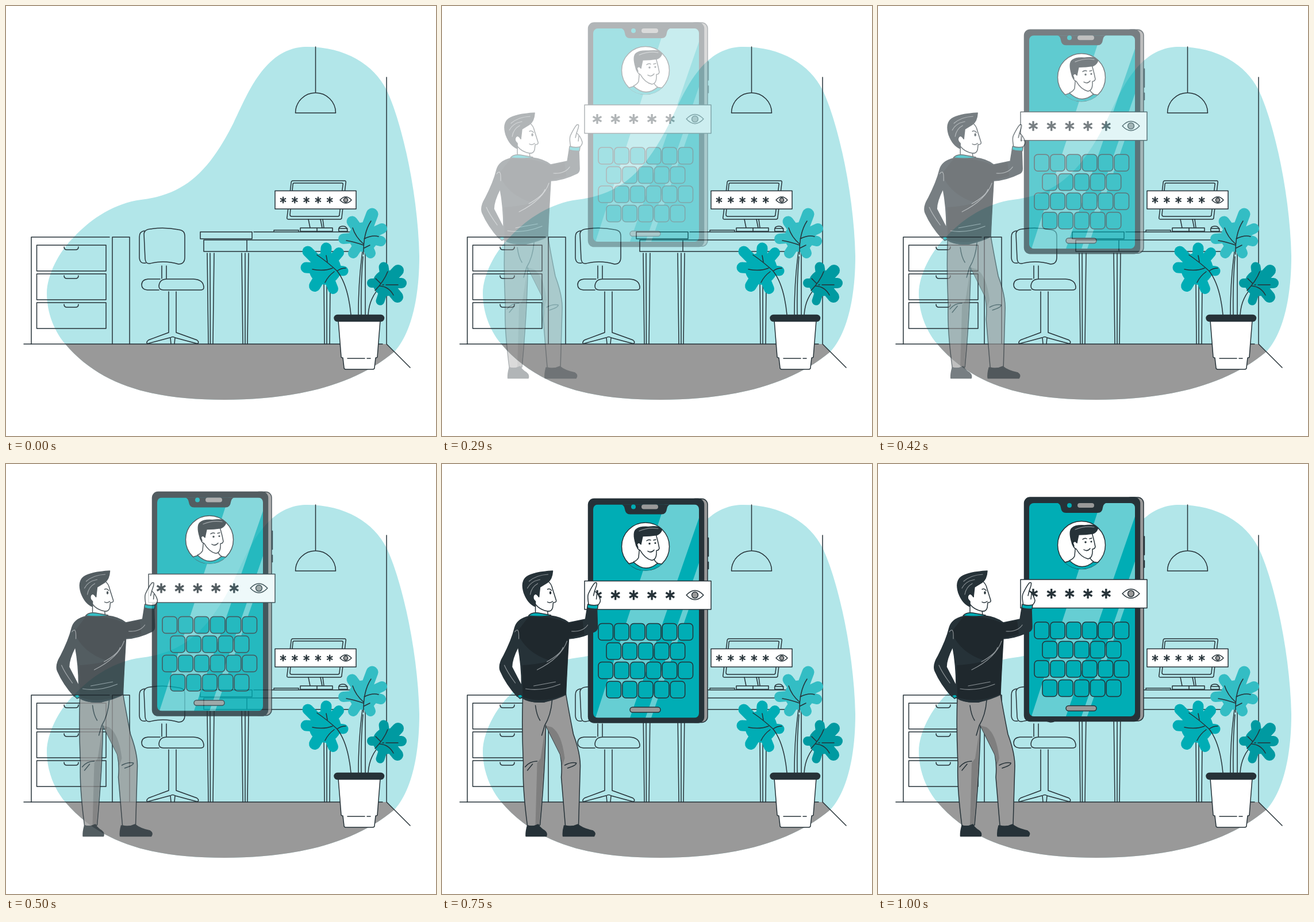
Recreate the animation shown at these times as an HTML page. Size 748x748 px, loop 1040 ms.

```html
<!DOCTYPE html>
<html lang="en">
<head>
<meta charset="utf-8">
<title>Password entry</title>
<style>
html, body { margin: 0; width: 100%; height: 100%; overflow: hidden; background: #fff; }
svg { display: block; width: 100%; height: 100%; }
.line { fill: none; stroke: #263238; stroke-width: 1.5; stroke-linecap: round; stroke-linejoin: round; }
.none { stroke: none; }
.white { fill: #fff; }
.teal { fill: #00adb5; }
.gray { fill: #999; }
.dark { fill: #263238; }
.shade { fill: #7f7f7f; stroke: none; }
.light { stroke: #8b9296; stroke-width: 1.2; fill: none; }
.glare { fill: #fff; opacity: .4; stroke: none; }
</style>
</head>
<body>
<svg viewBox="0 0 748 748">
  <defs>
    <path id="blob" d="M524 71C590 71 640 102 662 146C690 205 717 330 719 435C719 510 704 570 676 601C600 665 490 685 380 685C258 685 166 662 103 588C85 567 71 535 71 500C71 468 93 426 118 402C150 368 190 343 235 337C310 328 352 290 396 203C420 154 450 71 524 71Z"/>
    <clipPath id="room"><use href="#blob"/></clipPath>
    <clipPath id="screen"><rect x="263" y="68" width="184" height="371" rx="8"/></clipPath>
    <clipPath id="round"><circle cx="354" cy="141" r="42"/></clipPath>
  </defs>

  <use href="#blob" fill="#b2e6e9"/>
  <path d="M0 588H662L702 629L748 748H0Z" class="gray" clip-path="url(#room)"/>

  <g class="line">
    <path d="M31 588H655M662 124V588L703 629"/>
    <path d="M538.5 71V151M503.5 186A35 35 0 0 1 573.5 186Z"/>
    <!-- cabinet -->
    <path d="M180 402H44V588M185 402H215V588M185 402V588"/>
    <g id="drawers"></g>
    <!-- chair -->
    <path d="M240 396Q241 389 250 388Q275 384 300 389Q311 390 311 400V437Q311 449 300 449Q287 445 273 445Q262 445 250 448Q243 449 242 440Z"/>
    <path d="M241 391Q232 392 232 402V438Q233 449 243 447M271 452V474M279 452V474"/>
    <path d="M268 475H247Q236 476 236 485Q236 493 246 494H266"/>
    <path d="M280 475H326Q344 476 344 490Q344 494 338 494H274Q266 494 266 487Q267 475 280 475Z"/>
    <path d="M283 497V568L248 581Q243 585 246 587.5L285 577M296 497V568L332 581Q337 585 333 587.5L294 577M287 588L286 577Q290 574 294 577L293 588"/>
    <!-- desk -->
    <path d="M338 393H428V405H338ZM431 393H600M344 407V427H600M344 407H600M419 407V427"/>
    <path d="M350 430L352 588M355 430L355.5 588M362 430L360 588M410 430L412 588M416 430V588M422 430L420 588M553 480L554 588M558 480V588M564 480L563 588"/>
    <!-- computer -->
    <path d="M499 304H589Q592 304 591 308L584 368Q584 371 581 371H491Q488 371 489 367L496 308Q496 304 499 304ZM501 308H584Q587 308 586 311L580 363Q580 366 577 366H497Q494 366 494 363L499 311Q499 308 501 308Z"/>
    <path d="M526 371L529 386M547 371L550 386M551 371L553 386M512 386H568V392H512ZM541 386V392M466 392V390H509V392M579 392Q577 383 586 383Q594 383 594 392ZM579 387H594"/>
    <rect x="468" y="321.5" width="141" height="31.5" class="white"/>
    <g id="smallCode"></g>
  </g>

  <!-- plant -->
  <g class="line">
    <path d="M622 414Q613 470 613 537M625 430V537M621 436Q617 480 618 537M655 485Q632 505 630 537"/>
    <g id="leaves"></g>
    <path d="M541 433Q560 446 576 461Q595 485 600 537M568 456Q553 462 533 458M571 462Q560 470 555 481M576 461Q582 456 591 456M559 445L557 434"/>
    <path d="M622 432Q621 395 635 374M622 414Q608 402 603 386M623 405Q637 398 648 401M622 416Q605 410 592 408M623 421L633 416"/>
    <path d="M642 495Q658 478 664 462M655 485H657M661 485H682M650 487Q666 488 674 503M652 483L643 474"/>
    <path class="white" d="M578 547L583 610Q583 612 586 612L588 629Q588 632 591 632H638Q641 632 641 629L643 612Q646 612 646 610L651 547Z"/>
    <path d="M594 613H624M628 613H634"/>
    <rect x="571" y="537.5" width="86.5" height="11" rx="5.5" class="dark"/>
  </g>

  <!-- phone -->
  <g id="phone" class="line">
    <path class="dark" d="M462 126h1.5v32H462ZM462 168h1.5v12H462Z"/>
    <rect x="430" y="58" width="32" height="389" rx="10" class="gray"/>
    <rect x="254.5" y="58" width="201" height="389.5" rx="10" class="dark"/>
    <g clip-path="url(#screen)">
      <rect x="263" y="68" width="184" height="371" class="teal none"/>
      <path class="glare" d="M387 68H455L327 439H267ZM354 439H364L492 68H482Z"/>
      <path class="dark none" d="M309 67Q317 68 318 76Q319 85 327 85H382Q390 85 391 76Q392 68 400 67Z"/>
    </g>
    <circle cx="333" cy="72" r="4" class="teal none"/>
    <rect x="347" y="68" width="29" height="8" rx="4" class="gray none"/>
    <rect x="327" y="420.5" width="53" height="9" rx="4.5" class="gray"/>
    <g id="keys" class="teal"></g>
    <circle cx="354" cy="141" r="41.5" class="white"/>
    <g clip-path="url(#round)">
      <path class="teal" d="M322 172Q334 169 341 165Q354 182 372 170L386 172V190H320Z"/>
      <path class="white" d="M344 138L342 160Q340 165 333 168Q354 188 375 170Q368 166 368 158Z"/>
      <path class="white" d="M347 120L371 117Q375 128 378 144Q377 148 373 148Q374 164 365 165Q353 162 345 148Q338 145 339 137Q342 132 346 137Z"/>
      <path class="dark" d="M337 136Q331 116 338 111Q344 106 359 107Q375 105 383 109Q382 118 374 121Q362 123 349 123L346 137Q342 132 339 137L341 143Q338 142 337 136Z"/>
      <path class="light" d="M343 114Q360 107 376 110"/>
      <path d="M356 131Q360 128 363 130M368 130L372 129M358 149Q364 153 369 147"/>
      <circle cx="361" cy="136" r="1" class="dark"/><circle cx="371" cy="135" r=".8" class="dark"/>
    </g>
    <rect x="248" y="201" width="220" height="49.5" class="white"/>
    <g id="bigCode"></g>
  </g>

  <!-- man -->
  <g id="man" class="line">
    <path class="gray" d="M138 405Q150 416 175 414L213 400Q218 430 226 470Q238 502 238 525L235 628Q222 632 212 629L205 545Q207 522 203 505L178 455Q177 530 168 628Q156 632 146 629Q137 560 139 520Q136 460 138 405Z"/>
    <path class="shade" d="M178 455L203 505L207 524L211 512Q206 470 189 458ZM176 466L169 512L163 520L160 628L167 627L175 520Z"/>
    <path d="M160 420Q162 437 168 446M189 411Q187 437 176 455L171 472M142 527Q150 517 163 517M146 533L155 522M211 524Q222 518 231 520Q232 524 216 529"/>
    <path class="dark" d="M146 629Q143 640 143.5 647.5H179Q181 642 176 638Q168 633 165 627Q155 632 146 629ZM210 629Q207 640 208 647.5H262Q266 642 260 638Q242 634 234 627Q222 633 210 629Z"/>
    <path class="white" d="M160 235V266Q172 270 182 264L181 254Z"/>
    <path class="white" d="M166 212L181 203Q188 208 190 218L196 237Q197 241 191 241L190 250Q188 257 181 256Q168 254 160 244Q154 233 157 228Q162 223 166 231Z"/>
    <path class="dark" d="M190 186Q189 201 181 206L168 214L166 231Q161 223 157 228Q154 234 160 239V248Q147 243 140 224Q134 204 145 196Q157 188 190 186Z"/>
    <path class="light" d="M149 204Q162 193 182 192M146 216Q152 204 168 201M151 227Q153 214 164 208"/>
    <path d="M181 218Q185 216 188 220M181 240Q185 243 190 239"/>
    <ellipse cx="186" cy="224" rx="1" ry="2" class="dark"/>
    <path class="teal" d="M148 264Q153 258 165 259L187 263L181 267Z"/>
    <path class="dark" fill-rule="evenodd" d="M148 265Q128 270 124 285Q119 306 104 335Q95 350 99 360Q109 383 128 404L137 407Q150 416 175 414Q200 408 213 401Q214 370 218 304Q240 303 264 291Q268 289 268 283L267 252L250 251L247 270L218 276Q205 266 186 264Q165 266 148 265ZM130 318Q119 340 119 353L136 386Q136 350 130 318Z"/>
    <path fill="#1f282d" stroke="none" d="M148 266Q190 264 217 277L242 272L245 296L218 303L213 400Q175 418 138 406L137 350Q170 348 185 342Q142 328 128 292Z"/>
    <path class="light" d="M163 358Q205 337 215 308M180 344Q205 330 208 319M143 391Q170 396 203 383M157 386L195 379M124 292Q132 282 131 304M223 291Q243 292 251 280M106 350Q111 362 125 381"/>
    <path class="teal" d="M128 403L135 400L138 405L133 408Z"/>
    <path class="white" d="M253 246Q250 232 252 226Q258 213 263 207Q268 204 266 212L263 221Q270 226 273 237Q273 242 267 247Z"/>
    <path d="M263 221L261 229M267 226L266 235"/>
    <path class="teal" d="M251 244Q260 247 269 245L268 252Q258 253 250 250Z"/>
  </g>
</svg>
<script>
const get = id => document.getElementById(id);
const fill = (id, html) => { get(id).innerHTML = html; };
const times = (n, f) => Array.from({ length: n }, (_, i) => f(i)).join('');

fill('drawers', times(3, i => `<g transform="translate(0 ${i * 50})">
  <rect x="53.5" y="416" width="120.5" height="45"/>
  <path d="M101 419Q101 424 106 424H121Q126 424 126 419"/></g>`));

// Five asterisks and an eye, centred on a row
function code(x, y, gap, r, weight, eyeX) {
  const arm = 0.866 * r, w = r * 1.75, h = r * 1.9;
  const star = i => {
    const cx = x + i * gap;
    return `M${cx} ${y - r}V${y + r}M${cx - arm} ${y - r / 2}L${cx + arm} ${y + r / 2}M${cx - arm} ${y + r / 2}L${cx + arm} ${y - r / 2}`;
  };
  return `<path d="${times(5, star)}" stroke-width="${weight}" stroke-linecap="butt"/>
    <path class="white" d="M${eyeX - w} ${y}Q${eyeX} ${y - h} ${eyeX + w} ${y}Q${eyeX} ${y + h} ${eyeX - w} ${y}Z"/>
    <circle class="gray" cx="${eyeX}" cy="${y}" r="${r * 0.64}"/>`;
}
fill('smallCode', code(482, 337.5, 20.3, 5.7, 2.2, 591));
fill('bigCode', code(270, 225.5, 31.7, 8.5, 3.3, 440));

fill('keys', times(4, row => times(6 - row % 2, i =>
  `<rect x="${272 + row % 2 * 14 + i * 27.8}" y="${275 + row * 33.5}" width="25.5" height="29" rx="6"/>`)));

// A leaf is a fan of rounded lobes around its centre
const leaf = (color, x, y, r, tips) =>
  `<g stroke="${color}"><circle cx="${x}" cy="${y}" r="${r}" fill="${color}"/>` +
  tips.map(([tx, ty, w]) => `<path d="M${x} ${y}L${tx} ${ty}" stroke-width="${w}"/>`).join('') + '</g>';
fill('leaves',
  leaf('#33bdc4', 622, 402, 25, [[637, 362, 21], [602, 375, 19], [587, 405, 18], [604, 430, 18], [654, 387, 18], [652, 409, 18], [634, 430, 18]]) +
  leaf('#00adb5', 555, 457, 27, [[557, 421, 19], [525, 427, 19], [522, 455, 19], [537, 487, 20], [569, 492, 18], [579, 429, 18], [587, 461, 17]]) +
  leaf('#009aa1', 661, 482, 22, [[657, 454, 17], [682, 460, 20], [688, 482, 18], [681, 506, 20], [651, 513, 15], [636, 482, 16]]));

// y of cubic-bezier(.36, -.01, .5, 1.38) at x
function ease(x) {
  const curve = (a, b, s) => 3 * a * s * (1 - s) ** 2 + 3 * b * s * s * (1 - s) + s ** 3;
  let lo = 0, hi = 1;
  for (let i = 0; i < 24; i++) {
    const mid = (lo + hi) / 2;
    if (curve(0.36, 0.5, mid) < x) lo = mid; else hi = mid;
  }
  return curve(-0.01, 1.38, lo);
}

const LOOP = 1040, STEP = 41.6, SLIDE = 44.88;
const start = performance.now();
function draw(now) {
  const ms = Math.max(0, now - start) % LOOP;
  const step = Math.floor((Math.floor(ms / 10) * 10 + 5) / STEP);
  const p = ease(Math.min(1, (step * STEP + 25) / 1000));
  const shift = SLIDE * (p - 1), alpha = Math.max(0, Math.min(1, p));
  get('phone').setAttribute('transform', `translate(0 ${shift})`);
  get('man').setAttribute('transform', `translate(${shift} 0)`);
  for (const id of ['phone', 'man']) get(id).setAttribute('opacity', step ? alpha : 0);
  requestAnimationFrame(draw);
}
draw(start);
</script>
</body>
</html>
```
